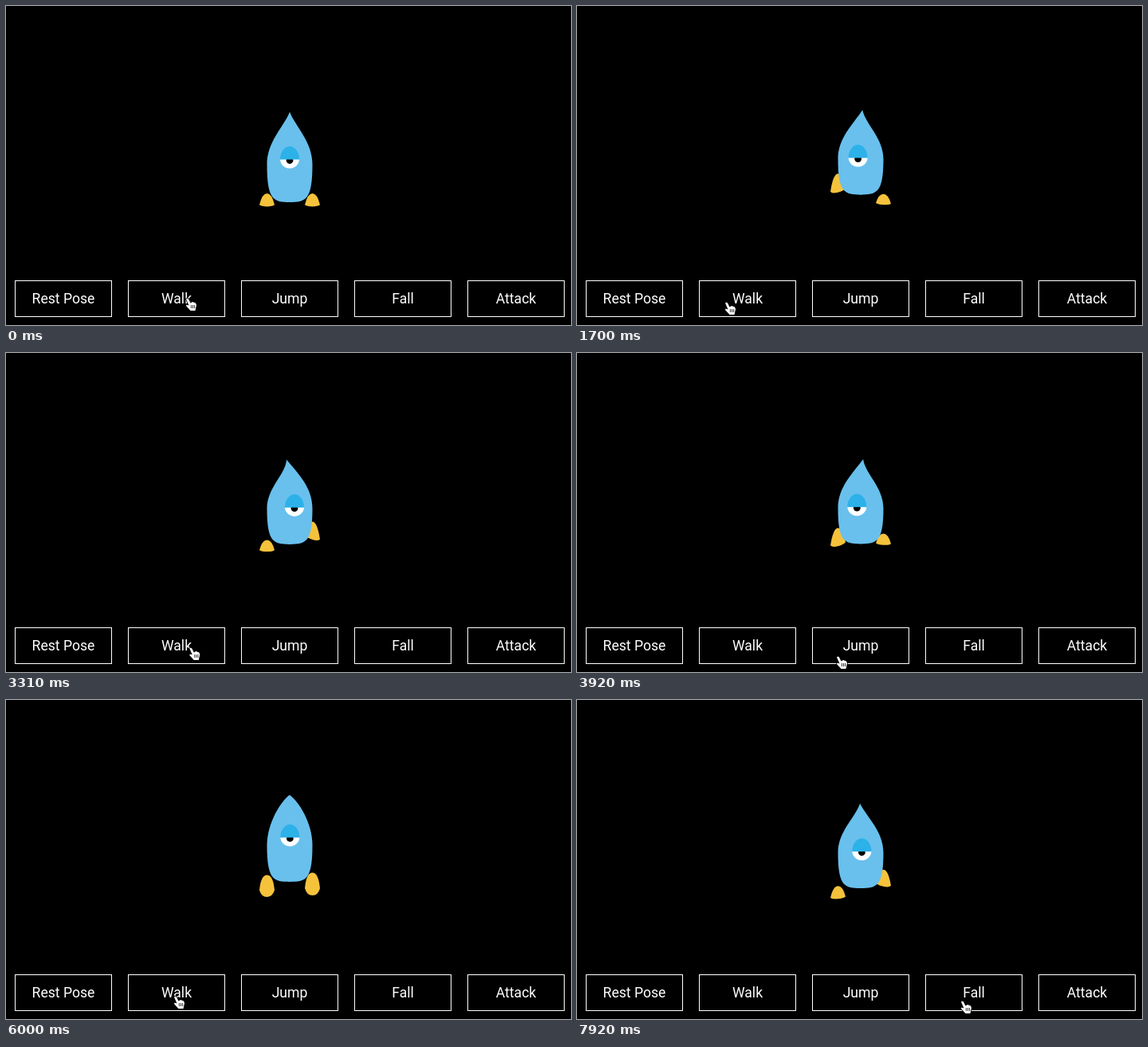
Animation, 709 px wide and 400 px high, one loop 8 s. Source, as an HTML page with a canvas:

```html
<!DOCTYPE html>
<html lang="en">
<head>
<meta charset="utf-8">
<title>Character poses</title>
<style>
  html, body { margin: 0; width: 100%; height: 100%; overflow: hidden; background: #000; }
  canvas { display: block; }
</style>
</head>
<body>
<canvas id="stage" width="709" height="400"></canvas>
<script>
const ctx = document.getElementById('stage').getContext('2d');
const LOOP = 8000;
const CENTER = 356;
const WALK_SPEED = 0.367; // degrees per ms
const COLORS = { body: '#69c0ed', lid: '#2cb1e8', foot: '#f5c23c' };
const LABELS = ['Rest Pose', 'Walk', 'Jump', 'Fall', 'Attack'];

const POINTER_START = { x: 225, y: 366 };
const POINTER_MOVES = [
  { from: 0, to: 430, x: 48, y: 371 },
  { from: 600, to: 1250, x: 185, y: 371 },
  { from: 2650, to: 3250, x: 229, y: 369 },
  { from: 3300, to: 3600, x: 325, y: 380 },
  { from: 5300, to: 5560, x: 210, y: 371 },
  { from: 6740, to: 7190, x: 481, y: 377 },
];

const sinDeg = a => Math.sin(a * Math.PI / 180);
const cosDeg = a => Math.cos(a * Math.PI / 180);
const progress = (t, start, length) => Math.max(0, Math.min(1, (t - start) / length));
const ease = u => u * u * (3 - 2 * u);

// Blends numbers, or objects of numbers with the same keys.
function mix(a, b, w) {
  if (typeof a === 'number') return a + (b - a) * w;
  return Object.fromEntries(Object.keys(a).map(key => [key, mix(a[key], b[key], w)]));
}

const foot = (top, bottom, round = 0, tilt = 0) => ({ top, bottom, round, tilt });

const REST = {
  tip: 133, base: 246, blunt: 0, lean: 0, eyeX: 0, eyeY: 192,
  left: foot(235, 251.5), right: foot(235, 251.5),
};
const JUMP = {
  tip: 109, base: 216, blunt: 1, lean: 0, eyeX: 0, eyeY: 157,
  left: foot(207.5, 244, 1), right: foot(207.5, 244, 1),
};

function strideFoot(phase) {
  const top = 223 - 13.5 * cosDeg(phase - 62);
  const bottom = 241.5 - 7.8 * Math.tanh(3 * sinDeg(phase + 45));
  return foot(top, bottom, 0, 1.2 + 1.2 * sinDeg(phase));
}

function walk(t, start) {
  const phase = WALK_SPEED * (t - start);
  const sway = sinDeg(phase - 8);
  const bounce = 2 - 2 * cosDeg(2 * (phase - 20));
  const stride = {
    tip: 130 + bounce, base: 236 + bounce, blunt: 0,
    lean: -4 * sway, eyeX: 6 * sway, eyeY: 189.5 + bounce,
    left: strideFoot(phase + 180), right: strideFoot(phase),
  };
  return mix(REST, stride, progress(t, start, 350));
}

function poseAt(t) {
  if (t < 5880) return mix(walk(t, 1095), JUMP, progress(t, 4280, 240));
  return mix(JUMP, walk(t, 5900), progress(t, 5870, 300));
}

function fillShape(color, trace) {
  ctx.beginPath();
  trace();
  ctx.closePath();
  ctx.fillStyle = color;
  ctx.fill();
}

function drawBody({ tip, base, blunt, lean, }) {
  const y = u => tip + (base - tip) * u;
  const neckX = mix(8, 14, blunt), neckY = y(mix(0.17, 0, blunt));
  for (const side of [-1, 1]) {
    const x = offset => CENTER + side * offset;
    fillShape(COLORS.body, () => {
      // The halves overlap a little, which hides the seam.
      ctx.moveTo(CENTER + lean, tip);
      ctx.bezierCurveTo(x(neckX) - 0.8 * lean, neckY, x(28.5), y(0.33), x(28.5), y(0.58));
      ctx.bezierCurveTo(x(28.5), y(0.98), x(20), base, CENTER, base);
      ctx.lineTo(x(-2), base);
      ctx.lineTo(x(-2), y(0.15));
    });
  }
}

function drawFoot({ top, bottom, round, tilt }, side) {
  const shoulder = mix(6, 9, round);
  const sideY = mix(top, bottom, mix(0.87, 0.55, round));
  const x = offset => CENTER + side * (28.5 + offset);
  fillShape(COLORS.foot, () => {
    ctx.moveTo(x(-9.5), sideY - tilt);
    ctx.quadraticCurveTo(x(-shoulder), top, x(0), top);
    ctx.quadraticCurveTo(x(shoulder), top, x(9.5), sideY + tilt);
    ctx.quadraticCurveTo(x(7), bottom + tilt, x(0), bottom);
    ctx.quadraticCurveTo(x(-7), bottom - tilt, x(-9.5), sideY - tilt);
  });
}

function drawEye(x, y) {
  fillShape('#fff', () => ctx.ellipse(x, y, 12, 11.5, 0, 0, Math.PI));
  fillShape('#000', () => ctx.arc(x, y + 1.5, 4.4, 0, 2 * Math.PI));
  fillShape(COLORS.lid, () => ctx.ellipse(x, y + 0.5, 12, 16.5, 0, Math.PI, 0));
}

function drawCharacter(t) {
  const pose = poseAt(t);
  drawFoot(pose.left, -1);
  drawFoot(pose.right, 1);
  drawBody(pose);
  drawEye(CENTER + pose.eyeX, pose.eyeY);
}

function drawButtons() {
  ctx.font = '17.6px Roboto, "Liberation Sans", sans-serif';
  ctx.textAlign = 'center';
  ctx.fillStyle = ctx.strokeStyle = '#fff';
  ctx.lineWidth = 1;
  LABELS.forEach((label, i) => {
    const x = 11 + 142 * i;
    ctx.strokeRect(x + 0.5, 344.5, 121, 45);
    ctx.fillText(label, x + 61, 373);
  });
}

const HAND = new Path2D('M1 1.5 2.5 .5 4 1.5 6.5 6.5 9 5 13 6.5 14 9 12.5 16H6.5L1 10 1.5 8.5 4.5 9.5Z');
const FINGERS = new Path2D('M7.4 9V13M9.5 9V13M11.6 9V13');
const ARROW = new Path2D('M.5 .5V14L3.8 11 6 16.5 8.4 15.4 6.2 10.2H10.5Z');

function drawPointer(t) {
  const { x, y } = POINTER_MOVES.reduce(
    (at, { from, to, x, y }) => mix(at, { x, y }, ease(progress(t, from, to - from))), POINTER_START);
  const overButton = (x + 3 - 11) % 142 < 122;
  ctx.save();
  ctx.translate(x, y);
  ctx.strokeStyle = overButton ? '#000' : '#fff';
  ctx.fillStyle = overButton ? '#fff' : '#000';
  if (overButton) {
    ctx.lineWidth = 1.6;
    ctx.stroke(HAND);
    ctx.fill(HAND);
    ctx.lineWidth = 0.8;
    ctx.stroke(FINGERS);
  } else {
    ctx.fill(ARROW);
    ctx.stroke(ARROW);
  }
  ctx.restore();
}

function draw(t) {
  ctx.fillStyle = '#000';
  ctx.fillRect(0, 0, 709, 400);
  drawCharacter(t);
  drawButtons();
  drawPointer(t);
}

let begin;
function tick(now) {
  begin ??= now;
  draw(Math.max(0, now - begin) % LOOP);
  requestAnimationFrame(tick);
}
draw(0);
requestAnimationFrame(tick);
</script>
</body>
</html>
```
